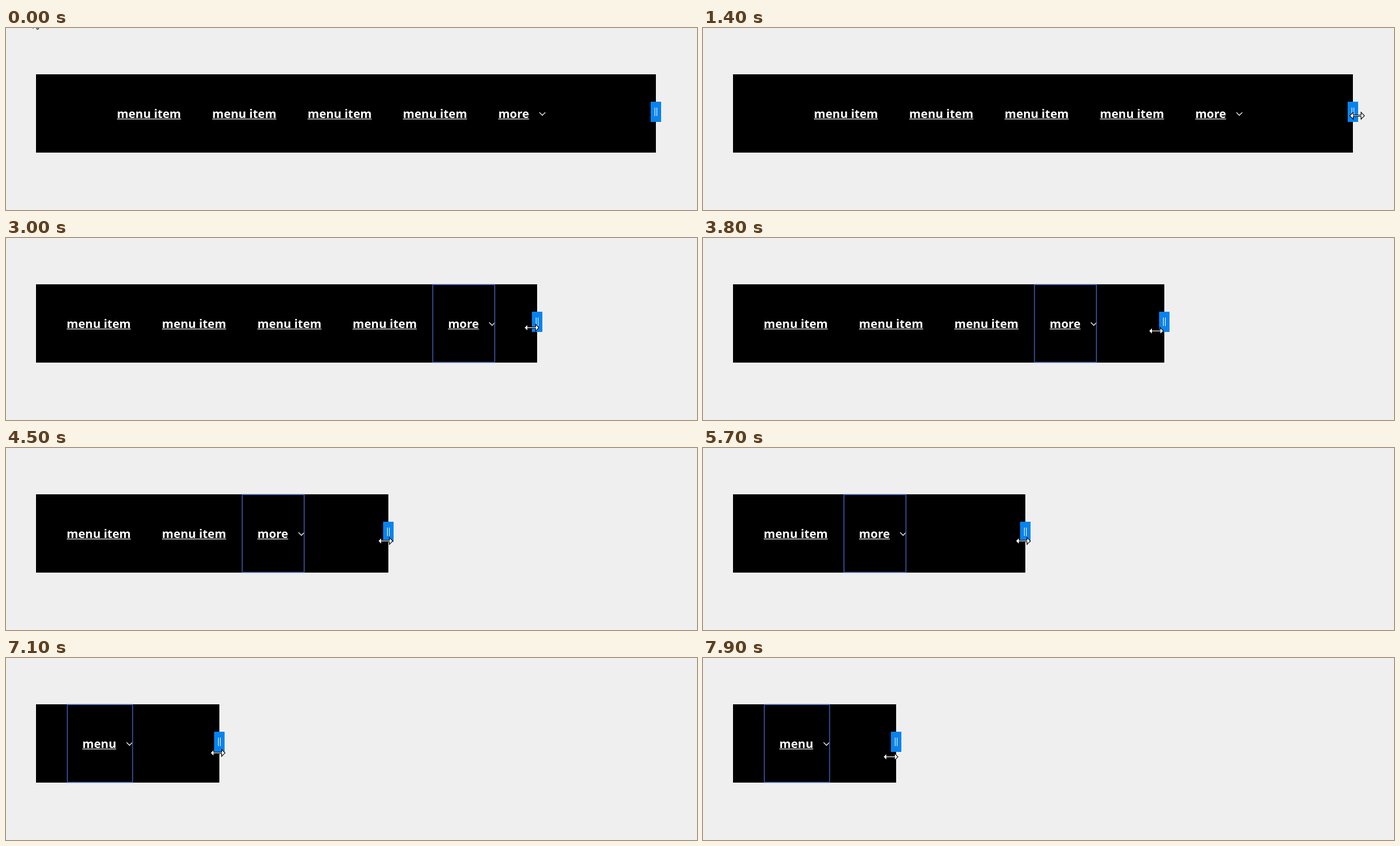
Animation, 1059 px wide and 279 px high, one loop 8000 ms. Source, as an HTML page with a canvas:

```html
<!DOCTYPE html>
<html lang="en">
<head>
<meta charset="utf-8">
<title>Responsive menu</title>
<style>
  html, body { margin: 0; width: 100%; height: 100%; overflow: hidden; background: #efefef; }
  canvas { display: block; }
</style>
</head>
<body>
<canvas id="stage" width="1059" height="279"></canvas>
<script>
const ctx = document.getElementById('stage').getContext('2d');
const LOOP = 8000, STEP = 100;
const BAR = { x: 46, y: 71, w: 950, h: 120 };
const FULL = BAR.x + BAR.w;
const PAD = 24, PITCH = 146.1;
const MIN_LEFT = 93, FULL_LEFT = 170;
const BASELINE = 138;
const HOVER = 1300, DRAG = 2000;
const LEAD = 110, GRIP = 7; // the pointer runs ahead of the handle it drags

// Key points as [time, value]
const EDGE = [[2100, FULL], [2700, 860], [3800, 707], [4500, 586], [5700, 494],
  [6600, 396], [7200, 319], [7900, 296], [8100, 272]];
const APPROACH = [[0, 41], [900, 949], [HOVER, FULL + GRIP]];
const HEIGHT = [[0, -17], [900, 174], [HOVER, 134], [2400, 134], [3800, 142], [6600, 142], [7900, 151]];

// Monotone cubic through the key points
function sample(keys, t) {
  const last = keys.length - 1;
  if (t <= keys[0][0]) return keys[0][1];
  if (t >= keys[last][0]) return keys[last][1];
  const slope = i => (keys[i + 1][1] - keys[i][1]) / (keys[i + 1][0] - keys[i][0]);
  const tangent = i => {
    if (i === 0 || i === last) return 0;
    const a = slope(i - 1), b = slope(i);
    return a * b <= 0 ? 0 : 2 * a * b / (a + b);
  };
  let i = 0;
  while (keys[i + 1][0] < t) i++;
  const [t0, v0] = keys[i], [t1, v1] = keys[i + 1];
  const d = t1 - t0, u = (t - t0) / d, w = 1 - u;
  return v0 * w * w * (1 + 2 * u) + v1 * u * u * (3 - 2 * u)
    + d * u * w * (w * tangent(i) - u * tangent(i + 1));
}

function rect(color, x, y, w, h) {
  ctx.fillStyle = color;
  ctx.fillRect(x, y, w, h);
}

function link(text, x) {
  const w = ctx.measureText(text).width;
  rect('#fff', x, BASELINE + 1, w, 1);
  ctx.fillText(text, x, BASELINE);
  return w;
}

function chevron(x, y) {
  ctx.strokeStyle = '#fff';
  ctx.lineWidth = 1.2;
  ctx.beginPath();
  ctx.moveTo(x - 4.5, y - 4.5);
  ctx.lineTo(x, y);
  ctx.lineTo(x + 4.5, y - 4.5);
  ctx.stroke();
}

function toggle(text, x, focused) {
  const end = x + link(text, x);
  chevron(end + 20.3, 133.8);
  if (!focused) return;
  const left = Math.round(x - PAD + 0.5), right = Math.round(end + PAD + 0.7);
  ctx.strokeStyle = '#3a55a5';
  ctx.lineWidth = 1.5;
  ctx.strokeRect(left, BAR.y + 0.5, right - left, BAR.h - 1);
}

function menu(edge, focused) {
  const left = Math.max(MIN_LEFT, FULL_LEFT - (FULL - edge) / 2);
  const moreWidth = ctx.measureText('more').width + PAD;
  const fits = n => MIN_LEFT + n * PITCH + moreWidth + 2 * PAD <= edge;
  let count = 4;
  while (count && !fits(count)) count--;
  for (let i = 0; i < count; i++) link('menu item', left + i * PITCH);
  if (count) toggle('more', left + count * PITCH, focused);
  else toggle('menu', left + PAD, focused);
}

function handle(x) {
  rect('#0783ee', x - 8, 113, 16, 31);
  for (const dx of [-2, 1]) rect('#e4f1fd', x + dx, 122, 1, 13);
}

function shape(x, y, points) {
  ctx.beginPath();
  points.forEach(([px, py]) => ctx.lineTo(x + px, y + py));
  ctx.closePath();
  ctx.strokeStyle = '#000';
  ctx.lineWidth = 2;
  ctx.stroke();
  ctx.fillStyle = '#fff';
  ctx.fill();
}

function arrow(x, y) {
  shape(x, y, [[1, 1.5], [1, 16], [4.5, 13], [7, 18.5], [8.5, 17.8], [6.2, 12], [11, 12]]);
}

function resizer(x, y) {
  const top = [[-10.5, 0], [-6.5, -4], [-6.5, -0.6], [6.5, -0.6], [6.5, -4]];
  const bottom = top.map(([px, py]) => [-px, -py]);
  shape(x - 0.5, y + 0.5, [...top, ...bottom]);
}

function pointer(t) {
  const x = t < HOVER ? sample(APPROACH, t) : sample(EDGE, t + LEAD) + GRIP;
  const cursor = t < HOVER ? arrow : resizer;
  cursor(Math.round(x), Math.round(sample(HEIGHT, t)));
}

function draw(t) {
  const edge = Math.round(sample(EDGE, t));
  rect('#efefef', 0, 0, 1059, 279);
  rect('#000', BAR.x, BAR.y, edge - BAR.x, BAR.h);
  ctx.font = 'bold 18px "Noto Sans", "Open Sans", sans-serif';
  menu(edge, t >= DRAG);
  handle(edge);
  pointer(t);
}

const start = performance.now();
function tick() {
  const t = (performance.now() - start) % LOOP;
  draw(Math.floor(t / STEP) * STEP);
  requestAnimationFrame(tick);
}
tick();
</script>
</body>
</html>
```
